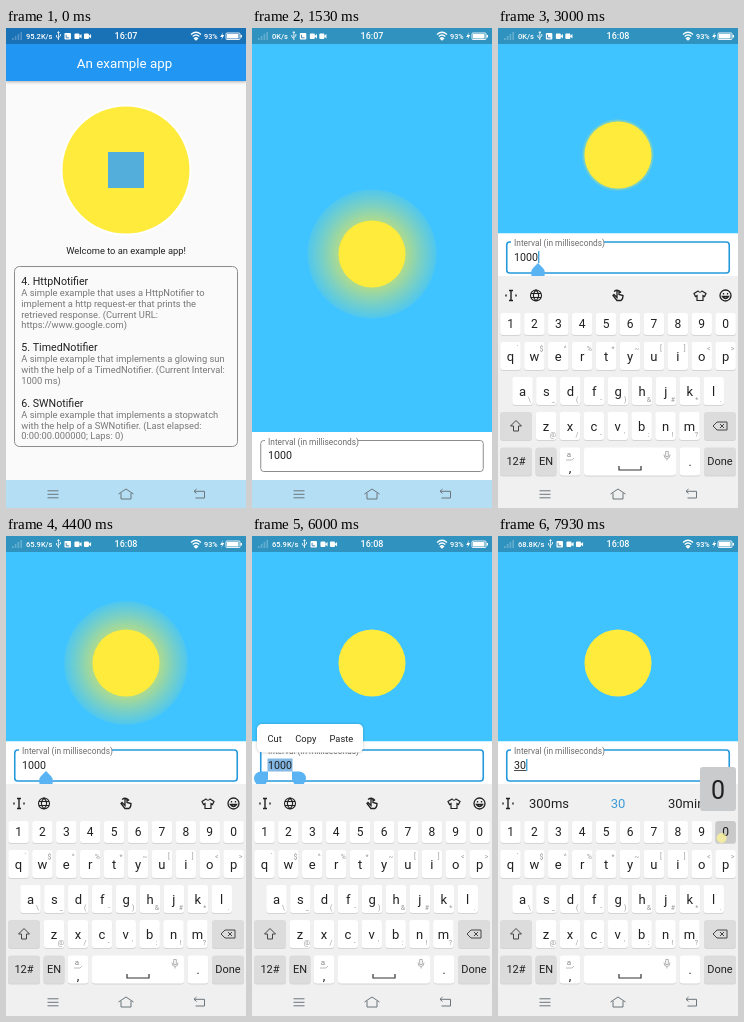
Write an HTML page with a canvas that moves like this. It is 240 by 480 pixels and loops after 8 s.

```html
<!DOCTYPE html>
<html lang="en">
<head>
<meta charset="utf-8">
<title>An example app</title>
<style>
html, body { margin: 0; width: 100%; height: 100%; overflow: hidden; }
canvas { display: block; width: 100vw; height: 100vh; }
</style>
</head>
<body>
<canvas id="stage"></canvas>
<script>
const W = 240, H = 480, LOOP = 8000;
const SKY = '#40c4ff', SUN = '#ffeb3b', FOCUS = '#2699dd', HANDLE = '#5ab3f2', INK = '#202020';
const dpr = window.devicePixelRatio || 1;
const stage = document.getElementById('stage');
const layer = document.createElement('canvas');
for (const c of [stage, layer]) {
  c.width = W * dpr;
  c.height = H * dpr;
  c.getContext('2d').scale(dpr, dpr);
}
const main = stage.getContext('2d');
let g = main;

// Helpers
const clamp = x => Math.max(0, Math.min(1, x));
const progress = (t, from, to) => clamp((t - from) / (to - from));
const smooth = x => x * x * (3 - 2 * x);
function bezier(x1, y1, x2, y2, x) {
  const at = (a, b, s) => 3 * a * s * (1 - s) ** 2 + 3 * b * s * s * (1 - s) + s ** 3;
  let lo = 0, hi = 1;
  for (let i = 0; i < 24; i++) {
    const mid = (lo + hi) / 2;
    if (at(x1, x2, mid) < x) lo = mid; else hi = mid;
  }
  return at(y1, y2, lo);
}
function rect(x, y, w, h, color, r = 0) {
  g.fillStyle = color;
  g.beginPath();
  g.roundRect(x, y, w, h, r);
  g.fill();
}
function frame(x, y, w, h, color, width, r) {
  g.strokeStyle = color;
  g.lineWidth = width;
  g.beginPath();
  g.roundRect(x, y, w, h, r);
  g.stroke();
}
function disc(x, y, r, color) {
  g.fillStyle = color;
  g.beginPath();
  g.arc(x, y, r, 0, 7);
  g.fill();
}
function text(str, x, y, size, color = INK, align = 'left', weight = 400) {
  g.font = `${weight} ${size}px Roboto, sans-serif`;
  g.fillStyle = color;
  g.textAlign = align;
  g.fillText(str, x, y);
}
function icon(path, x, y, color, width = 1, filled = false) {
  g.save();
  g.translate(x, y);
  g.lineWidth = width;
  g.strokeStyle = g.fillStyle = color;
  const shape = new Path2D(path);
  if (filled) g.fill(shape); else g.stroke(shape);
  g.restore();
}

// First page
const items = [
  [257, '4. HttpNotifier', 'A simple example that uses a HttpNotifier to',
    'implement a http request-er that prints the', 'retrieved response. (Current URL:', 'https://www.google.com)'],
  [323, '5. TimedNotifier', 'A simple example that implements a glowing sun',
    'with the help of a TimedNotifier. (Current Interval:', '1000 ms)'],
  [378.7, '6. SWNotifier', 'A simple example that implements a stopwatch',
    'with the help of a SWNotifier. (Last elapsed:', '0:00:00.000000; Laps: 0)']
];
function listPage() {
  rect(0, 0, W, H, '#fafafa');
  g.save();
  g.shadowColor = 'rgba(0,0,0,.3)';
  g.shadowBlur = 3 * dpr;
  g.shadowOffsetY = dpr;
  rect(0, 0, W, 53, '#2196f3');
  g.restore();
  text('An example app', 118.5, 39.5, 13.33, '#fff', 'center');
  disc(120, 142, 65.5, '#fff');
  disc(120, 142, 63.5, SUN);
  rect(102, 124, 36, 36, '#54aedc');
  text('Welcome to an example app!', 120, 226, 9.33, INK, 'center');
  frame(8.5, 238.5, 223, 180, '#8c8c8c', 1, 5);
  for (const [y, title, ...lines] of items) {
    text(title, 15.3, y, 10.67);
    lines.forEach((line, i) => text(line, 15.3, y + 11.4 + i * 10.67, 9.33, '#777'));
  }
}

// Sun page
const pulses = [[900, 1360, 0, 1], [2430, 3120, 1, 0], [3870, 4520, 0, 1],
  [5200, 5900, 1, 0], [6470, 6900, 0, 0.6], [6900, 7200, 0.6, 0]];
function glowAt(t) {
  let glow = 0;
  for (const [from, to, a, b] of pulses)
    if (t >= from) glow = a + (b - a) * smooth(progress(t, from, to));
  return glow;
}
function sun(y, glow) {
  if (glow > 0.01) {
    const r = 33.5 + 31 * glow;
    const halo = g.createRadialGradient(120, y, 32, 120, y, r);
    halo.addColorStop(0, 'rgba(255,235,59,.6)');
    halo.addColorStop(0.5, 'rgba(255,235,59,.32)');
    halo.addColorStop(1, 'rgba(255,235,59,.08)');
    disc(120, y, r, halo);
  }
  disc(120, y, 33.5, SUN);
}
// Round handle with one square corner, turned by angle around its tip
function handle(x, y, angle) {
  g.save();
  g.translate(x, y);
  g.rotate(angle);
  rect(0, 0, 14, 14, HANDLE, [0, 7, 7, 7]);
  g.restore();
}
function field(t, y) {
  const focused = t >= 1900, selected = t >= 5300 && t < 6900;
  const value = t < 6900 ? '1000' : t < 7850 ? '3' : '30';
  rect(0, y - 8, W, 60, '#fff');
  frame(8.75, y + 0.5, 222.5, 31, focused ? FOCUS : '#8c8c8c', focused ? 1.6 : 1, 3);
  rect(13, y - 2, 93, 5, '#fff');
  text('Interval (in milliseconds)', 16, y + 4.6, 8.35, '#6c6c6c');
  if (selected) rect(15.5, y + 9, 25, 13, '#83b9e4');
  text(value, 16, y + 19.3, 10.67);
  const end = 16 + g.measureText(value).width;
  if (t >= 6900) rect(16, y + 20.7, end - 16, 0.8, INK);
  const blinkOn = t >= 6900 || Math.floor((t + 100) / 500) % 2 === 0;
  if (focused && !selected && blinkOn) rect(end + 0.2, y + 9.5, 1.2, 12, FOCUS);
  if (selected) {
    handle(16, y + 22, Math.PI / 2);
    handle(40, y + 22, 0);
  } else if (focused && t < 5300) handle(40, y + 21.5, Math.PI / 4);
}
function editMenu(t) {
  if (t < 5500 || t >= 6900) return;
  g.save();
  g.globalAlpha = progress(t, 5500, 5650);
  g.shadowColor = 'rgba(0,0,0,.25)';
  g.shadowBlur = 3 * dpr;
  rect(5, 188, 106, 28.5, '#fff', 5);
  g.shadowColor = 'transparent';
  text('Cut', 15.5, 205.6, 9.33);
  text('Copy', 43.3, 205.6, 9.33);
  text('Paste', 77.5, 205.6, 9.33);
  g.restore();
}
function sunPage(t, lift) {
  rect(0, 0, W, H, '#fff');
  rect(0, 0, W, 404 - 198.5 * lift, SKY);
  sun(226 - 99 * lift, glowAt(t));
  field(t, 412 - 198.5 * lift);
}

// Keyboard
function key(x, y, w, h, label, color = '#fff', size = 12) {
  rect(x - w / 2, y - h / 2 + 1, w, h, '#d4d4d4', 3);
  rect(x - w / 2, y - h / 2, w, h, color, 3);
  if (label) text(label, x, y + size * 0.36, size, INK, 'center');
}
function keyRow(letters, hints, x0, y, hintY) {
  [...letters].forEach((letter, i) => {
    const x = x0 + i * 23.9;
    key(x, y, 20.5, 28, letter, '#fff', 13);
    text(hints[i], x + 7, y + hintY, 7, '#9a9a9a', 'center');
  });
}
function toolbar() {
  icon('M-5 0V0M-2 -5H2M-2 5H2M0 -5V5M-5 -1V1M5 -1V1', 13, 267.5, INK, 1.4);
  icon('M5.5 0A5.5 5.5 0 1 1 -5.5 0A5.5 5.5 0 1 1 5.5 0M-5 -2H5M-5 2H5M0 -5.5C-3.5 -2 -3.5 2 0 5.5C3.5 2 3.5 -2 0 -5.5', 38, 267.5, INK, 1.1);
  icon('M-4 -1L-1 2V-4Q0 -6 1 -4V-1L5 0Q5 4 3 5H-1L-5 0ZM-4 -4Q0 -7 3 -3', 120, 267.5, INK, 1.3);
  icon('M-2 -4.5Q0 -2 2 -4.5L6 -2L4.5 1L3 0V5H-3V0L-4.5 1L-6 -2Z', 202, 267.5, INK, 1.2);
  icon('M5.5 0A5.5 5.5 0 1 1 -5.5 0A5.5 5.5 0 1 1 5.5 0M-3 1Q0 5 3 1ZM-2 -2.5V-1M2 -2.5V-1', 227.5, 267.5, INK, 1.3);
}
function suggestions(t) {
  icon('M-2 -5H2M-2 5H2M0 -5V5M-5 -1V1M5 -1V1', 10, 267.5, INK, 1.4);
  const both = t >= 7850;
  if (both) text('300ms', 51, 272.3, 13, INK, 'center');
  text(both ? '30' : '3', 120, 272.3, 13, '#3d9ad8', 'center');
  if (both) text('30min', 170, 272.3, 13);
}
function keyPopup(label, x) {
  rect(x - 18, 231, 36, 44, '#c9cbcc', 3);
  text(label, x, 262.5, 25, INK, 'center');
}
function keyboard(t) {
  const grey = '#dcdcdc';
  const pressed = t >= 6900 && t < 7060 ? '3' : t >= 7780 ? '0' : '';
  rect(0, 248, W, 232, '#f0f0f0');
  if (t < 6900) toolbar(); else suggestions(t);
  [...'1234567890'].forEach((n, i) =>
    key(12.5 + i * 23.9, 296, 20.5, 22, n, n === pressed ? '#c9c9c9' : '#fff', 12));
  keyRow('qwertyuiop', '`$^%*~[]<>', 12.5, 328, -5);
  keyRow('asdfghjkl', '\\_(-)&#*.', 24.5, 363, 11);
  keyRow('zxcvbnm', '@/-\':!?', 48, 398, 11);
  key(18, 398, 32, 28, '', grey);
  icon('M0 -5.5L5.5 0H2.5V5H-2.5V0H-5.5Z', 18, 398, '#444', 1);
  key(222, 398, 32, 28, '', grey);
  icon('M-7 0L-3 -4H7V4H-3ZM0 -2L4 2M4 -2L0 2', 222, 398, '#444', 1);
  key(18, 433.5, 32, 28, '12#', grey, 11);
  key(48, 433.5, 21, 28, 'EN', grey, 11);
  key(72, 433.5, 20.5, 28, '');
  text(',', 72, 444, 13, INK, 'center');
  text('a', 71, 429, 8, '#888', 'center');
  icon('M-3 3H3L5 1', 71, 429, '#aaa', 0.8);
  key(132, 433.5, 92, 28, '');
  icon('M-11 -2V2H11V-2', 132, 440, '#333', 1.2);
  icon('M-1.3 -4H1.3V1H-1.3ZM-3 -1Q-3 3 0 3Q3 3 3 -1M0 3V5', 169, 427.5, '#aaa', 0.9);
  key(192, 433.5, 20.5, 28, '.');
  key(222, 433.5, 32, 28, 'Done', grey, 11);
  if (pressed) {
    const x = pressed === '0' ? 227.6 : 60.3;
    keyPopup(pressed, Math.min(x, 220));
    disc(x - 4, 302, 5, 'rgba(255,245,150,.75)');
  }
}

// System bars
function statusBar(t) {
  rect(0, 0, W, 16, 'rgba(0,0,0,.25)');
  const speed = t < 300 ? '95.2K/s' : t < 3400 ? '0K/s' : t < 6500 ? '65.9K/s' : '68.8K/s';
  for (let i = 0; i < 4; i++) rect(6 + i * 2.8, 10 - i * 2, 1.6, 2 + i * 2, 'rgba(255,255,255,.25)');
  text(speed, 20, 11, 7.5, '#fff', 'left', 500);
  const x = 20 + g.measureText(speed).width;
  icon('M0 -4V4M-2 -1V1L0 2.5M2 -2V0L0 1.5M-1 -3L0 -4.5L1 -3', x + 6, 8, '#fff', 0.8);
  rect(x + 12, 5, 6.5, 6.5, '#fff', 1);
  icon('M-1.5 -1.5V1.5H1.5', x + 15.2, 8.3, '#3a80b0', 0.9);
  for (const dx of [22, 31.5]) {
    rect(x + dx, 5.5, 5, 5.5, '#fff', 1);
    icon('M0 0L2.6 -2.2V2.2Z', x + dx + 4.5, 8.2, '#fff', 1, true);
  }
  text(t < 2600 ? '16:07' : '16:08', 120, 11.4, 9, '#fff', 'center', 500);
  icon('M-5 -2Q0 -6.5 5 -2M-3.3 0Q0 -3 3.3 0M-1.6 2Q0 0.5 1.6 2L0 3.5Z', 190, 8.5, '#fff', 1.2);
  text('93%', 198, 11, 7.3, '#fff', 'left', 500);
  icon('M1 -4L-2 1H0L-1 4L2 -1H0Z', 216.2, 8, '#fff', 1, true);
  frame(220, 5, 14, 6.5, '#fff', 0.9, 1);
  rect(221, 6, 11.5, 4.5, '#fff');
  rect(234.6, 7, 1.4, 2.5, '#fff');
}
function navBar(color) {
  rect(0, 452, W, 28, color);
  const ink = '#6b757b';
  icon('M-5.5 -3.5H5.5M0 0M-5.5 0H5.5M-5.5 3.5H5.5', 47, 466.3, ink, 1);
  icon('M-7.5 0L0 -5L7.5 0M-5 -1V5H5V-1', 120, 466, ink, 1);
  icon('M-3 -5.5L-5.5 -3.2L-3 -1M-5.5 -3.2H5V3.5H-4', 193.5, 466.5, ink, 1);
}

function draw(t) {
  const enter = progress(t, 917, 1217);
  const lift = bezier(0.4, 0, 0.2, 1, progress(t, 2560, 2820));
  g = main;
  if (enter < 1) listPage();
  if (enter > 0) {
    g = layer.getContext('2d');
    sunPage(t, lift);
    g = main;
    g.globalAlpha = bezier(0.42, 0, 1, 1, enter);
    g.drawImage(layer, 0, 120 * (1 - bezier(0.4, 0, 0.2, 1, enter)), W, H);
    g.globalAlpha = 1;
  }
  editMenu(t);
  if (lift > 0) {
    g.save();
    g.translate(0, 204 * (1 - lift));
    keyboard(t);
    g.restore();
  }
  statusBar(t);
  navBar(lift > 0 ? '#f0f0f0' : '#b3def4');
}

const start = performance.now();
function tick() {
  draw((performance.now() - start) % LOOP);
  requestAnimationFrame(tick);
}
tick();
</script>
</body>
</html>
```
